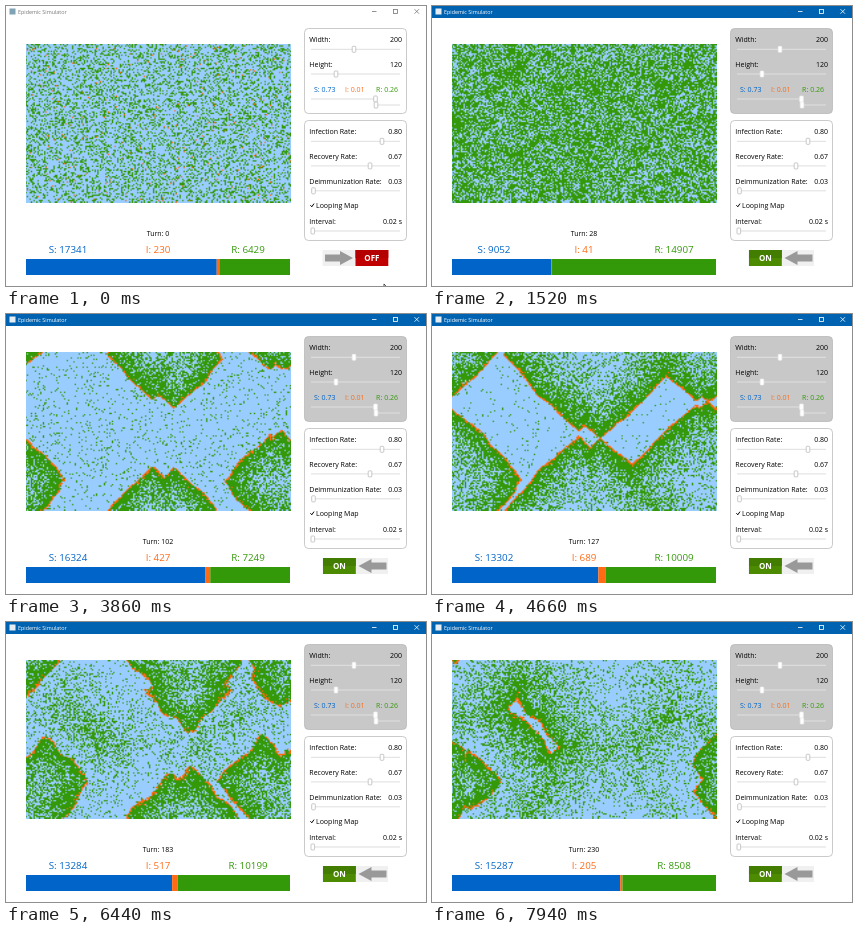
Recreate the animation shown at these times as an HTML page with a canvas. Size 420 px wide and 280 px high, loop 8000 ms.

```html
<!DOCTYPE html>
<html lang="en">
<head>
<meta charset="utf-8">
<title>Epidemic Simulator</title>
<style>
  html, body { margin: 0; width: 100%; height: 100%; overflow: hidden; background: #fff; }
  canvas { display: block; }
</style>
</head>
<body>
<canvas id="stage" width="420" height="280"></canvas>
<script>
const ctx = document.getElementById('stage').getContext('2d');
const LOOP = 8000, START = 615, TURNS_PER_MS = 0.03137;
const COLS = 200, ROWS = 120, CELLS = COLS * ROWS;
const MAP = { x: 19.5, y: 38, w: 265.5, h: 158.5 };
const CELL_W = MAP.w / COLS, CELL_H = MAP.h / ROWS;
const BLUE = '#0064c8', ORANGE = '#ff6a14', GREEN = '#339908';
const FONT = '"Open Sans", "Noto Sans", sans-serif';
const STATE_RGB = { S: [153, 204, 255], I: [255, 106, 14], R: [51, 153, 8] };

const ramp = (t, from, to) => Math.min(1, Math.max(0, (t - from) / (to - from)));
const turnAt = time => Math.max(0, Math.round((time - START) * TURNS_PER_MS));

// turn, susceptible, infected; straight lines in between
const countKeys = [
  [0, 17341, 230], [6, 10200, 4300], [14, 5400, 1100], [28, 9052, 41], [75, 19587, 145],
  [127, 13302, 689], [155, 12978, 382], [183, 13284, 517], [230, 15287, 205],
];
function countsAt(turn) {
  const next = Math.max(1, countKeys.findIndex(key => key[0] >= turn));
  const a = countKeys[next - 1], b = countKeys[next];
  const p = ramp(turn, a[0], b[0]);
  const [s, i] = [1, 2].map(k => Math.round(a[k] + (b[k] - a[k]) * p));
  return { s, i, r: CELLS - s - i };
}

// ---- epidemic: every cell gets its infection times from expanding waves ----
let seed = 20177;
function random() {
  seed = (seed + 0x6D2B79F5) | 0;
  let t = Math.imul(seed ^ (seed >>> 15), 1 | seed);
  t = (t + Math.imul(t ^ (t >>> 7), 61 | t)) ^ t;
  return ((t ^ (t >>> 14)) >>> 0) / 4294967296;
}
const centerX = col => MAP.x + (col + 0.5) * CELL_W;
const centerY = row => MAP.y + (row + 0.5) * CELL_H;

// Nearly diamond-shaped distance on a map that wraps around.
function distance(x, y, sx, sy) {
  let dx = Math.abs(x - sx), dy = Math.abs(y - sy);
  dx = Math.min(dx, MAP.w - dx);
  dy = Math.min(dy, MAP.h - dy);
  return dx + dy + 0.08 * Math.abs(dx - dy);
}

const firstCases = Array.from({ length: 310 }, () =>
  [centerX(Math.floor(random() * COLS)), centerY(Math.floor(random() * ROWS)), 0]);
// sources: x, y, turn of outbreak
const waves = [
  { speed: 0.66, rough: 0, sources: firstCases },
  { speed: 1.31, rough: 0.7, sources: [
    [147, 40, 64], [168, 45, 61], [264, 168, 63], [276, 166, 61], [280, 176, 69]] },
  { speed: 1.45, rough: 1.6, sources: [
    [165, 38, 150], [182, 68, 151], [184, 42, 143],
    [40, 160, 150], [256, 160, 149], [281, 180, 143], [274, 55, 160]] },
  { speed: 1.31, rough: 1.6, sources: [[16, 142, 209], [38, 160, 204], [22, 170, 207]] },
];
const immuneDuration = () => -Math.log(1 - random()) / 0.03;
const illDuration = () => 1 + Math.floor(Math.log(1 - random()) / Math.log(0.33));

const initialImmunity = new Float32Array(CELLS);
for (const wave of waves) {
  wave.start = new Float32Array(CELLS).fill(1e6);
  wave.recover = new Float32Array(CELLS);
  wave.end = new Float32Array(CELLS);
}
for (let cell = 0; cell < CELLS; cell++) {
  const x = centerX(cell % COLS), y = centerY(Math.floor(cell / COLS));
  let immuneUntil = random() < 0.27 ? immuneDuration() : -1;
  initialImmunity[cell] = immuneUntil;
  waves.forEach((wave, k) => {
    let arrival = Math.min(...wave.sources.map(([sx, sy, t0]) =>
      t0 + distance(x, y, sx, sy) / wave.speed));
    if (k === 0) arrival = 24 * (1 - Math.exp(-arrival * (0.6 + 0.8 * random()) / 17));
    else arrival += wave.rough * (Math.sin(x / 5 + k * 2 + Math.sin(y / 7)) +
      Math.sin(y / 6 - k + Math.sin(x / 9)) + random() - 0.5);
    if (arrival < immuneUntil) return;
    wave.start[cell] = arrival;
    wave.recover[cell] = arrival + illDuration();
    immuneUntil = wave.end[cell] = wave.recover[cell] + immuneDuration();
  });
}

function stateOf(cell, turn) {
  for (let k = waves.length - 1; k >= 0; k--) {
    const wave = waves[k];
    if (turn < wave.start[cell]) continue;
    return turn < wave.recover[cell] ? 'I' : turn < wave.end[cell] ? 'R' : 'S';
  }
  return turn < initialImmunity[cell] ? 'R' : 'S';
}

const mapCanvas = document.createElement('canvas');
mapCanvas.width = COLS;
mapCanvas.height = ROWS;
const mapCtx = mapCanvas.getContext('2d');
const pixels = mapCtx.createImageData(COLS, ROWS);
pixels.data.fill(255);

function paintMap(turn) {
  for (let cell = 0; cell < CELLS; cell++) {
    pixels.data.set(STATE_RGB[stateOf(cell, turn)], cell * 4);
  }
  mapCtx.putImageData(pixels, 0, 0);
}

// ---- drawing helpers ----
function text(str, x, y, { size = 7, color = '#000', align = 'left', weight = 400 } = {}) {
  ctx.font = `${weight} ${size}px ${FONT}`;
  ctx.fillStyle = color;
  ctx.textAlign = align;
  ctx.fillText(str, x, y);
}
function box(x, y, w, h, fill) {
  ctx.fillStyle = fill;
  ctx.fillRect(x, y, w, h);
}
function roundBox(x, y, w, h, radius, fill, stroke) {
  ctx.beginPath();
  ctx.roundRect(x, y, w, h, radius);
  ctx.fillStyle = fill;
  ctx.fill();
  ctx.strokeStyle = stroke;
  ctx.lineWidth = 0.7;
  ctx.stroke();
}
function trace(points) {
  ctx.beginPath();
  points.forEach(([x, y]) => ctx.lineTo(x, y));
}
function polygon(points, fill) {
  trace(points);
  ctx.closePath();
  ctx.fillStyle = fill;
  ctx.fill();
}
function line(points, color, width = 0.8) {
  trace(points);
  ctx.strokeStyle = color;
  ctx.lineWidth = width;
  ctx.stroke();
}
function slider(thumb, y, disabled, from = 305, to = 394) {
  box(from, y - 0.5, to - from, 1, disabled ? '#e2e2e2' : '#dedede');
  roundBox(thumb - 1.8, y - 3, 3.6, 6, 0.8, '#fff', disabled ? '#eee' : '#b4b4b4');
}
function setting(label, value, baseline, thumb, disabled) {
  text(label, 303.3, baseline);
  text(value, 396, baseline, { align: 'right' });
  slider(thumb, baseline + 7.3, disabled);
}

// ---- interface parts ----
function drawTitleBar(active) {
  const color = active ? '#fff' : '#777';
  box(0, 0, 420, 12, active ? '#0063b1' : '#fff');
  box(3.5, 2.5, 6, 6, active ? '#e6eef4' : '#7fa3b5');
  text('Epidemic Simulator', 12, 7.6, { size: 5.4, color });
  line([[366, 5.5], [370.5, 5.5]], color);
  ctx.strokeRect(387.5, 3.5, 4, 4);
  line([[408.5, 3.2], [413, 7.7]], color);
  line([[413, 3.2], [408.5, 7.7]], color);
}

function drawSettings(on) {
  roundBox(298.5, 22.5, 102, 85, 4, on ? '#c8c8c8' : '#fff', '#b4b4b4');
  setting('Width:', '200', 36, 348, on);
  setting('Height:', '120', 60.7, 330, on);
  text('S: 0.73', 308, 85.5, { color: BLUE });
  text('I: 0.01', 339, 85.5, { color: ORANGE });
  text('R: 0.26', 392, 85.5, { color: GREEN, align: 'right' });
  slider(369.5, 93, on, 305, 369);
  slider(370, 99, on, 370, 394);

  roundBox(298.5, 114.5, 102, 120, 4, '#fff', '#b4b4b4');
  setting('Infection Rate:', '0.80', 128, 376);
  setting('Recovery Rate:', '0.67', 152.6, 364);
  setting('Deimmunization Rate:', '0.03', 177.5, 307.5);
  line([[304.4, 199.2], [305.8, 200.8], [308, 197.6]], '#000', 1);
  text('Looping Map', 310, 201.7);
  setting('Interval:', '0.02 s', 217.7, 306.8);
}

function drawToggle(on) {
  const labelX = on ? 317 : 349.5;
  box(316.5, 244, 65.5, 16, '#f0f0f0');
  box(labelX, 244, 32.8, 16, on ? '#4c8a00' : '#c00000');
  box(labelX, 244, 32.8, 8, on ? '#437d00' : '#b40000');
  text(on ? 'ON' : 'OFF', labelX + 16.4, 255, { size: 8, color: '#fff', align: 'center', weight: 700 });
  const tip = on ? 352.5 : 347, dir = on ? -1 : 1;
  polygon([[0, 0], [-13, -7], [-13, -3.5], [-28, -3.5], [-28, 3.5], [-13, 3.5], [-13, 7]]
    .map(([x, y]) => [tip + dir * x, 252 + y]), '#999');
}

function drawCounts(turn) {
  const { s, i, r } = countsAt(turn);
  text('Turn: ' + turn, 152, 229.7, { align: 'center' });
  let x = 20;
  [['S', s, BLUE], ['I', i, ORANGE], ['R', r, GREEN]].forEach(([name, count, color], k) => {
    text(`${name}: ${count}`, 62 + 90 * k, 246.7, { size: 9.8, color, align: 'center' });
    const width = count / CELLS * 264;
    box(x, 253, width, 16, color);
    x += width;
  });
}

function drawCursor(time) {
  const arrive = ramp(time, 0, 480), leave = ramp(time, 880, 1350);
  const x = 378 - 15 * arrive + 29 * leave, y = 278 - 27 * arrive + 32 * leave;
  const outline = [[0, 0], [0, 8], [1.9, 6.3], [3.1, 9], [4.3, 8.4], [3.1, 5.9], [5.6, 5.8], [0, 0]]
    .map(([dx, dy]) => [x + dx, y + dy]);
  polygon(outline, '#fff');
  line(outline, '#111', 0.7);
}

let paintedTurn = -1;
function tick() {
  const time = performance.now() % LOOP;
  const turn = turnAt(time), on = time >= START;
  if (turn !== paintedTurn) {
    paintMap(turn);
    paintedTurn = turn;
  }
  box(0, 0, 420, 280, '#fff');
  drawTitleBar(on);
  ctx.drawImage(mapCanvas, MAP.x, MAP.y, MAP.w, MAP.h);
  drawSettings(on);
  drawCounts(turn);
  drawToggle(on);
  drawCursor(time);
  requestAnimationFrame(tick);
}
tick();
</script>
</body>
</html>
```
